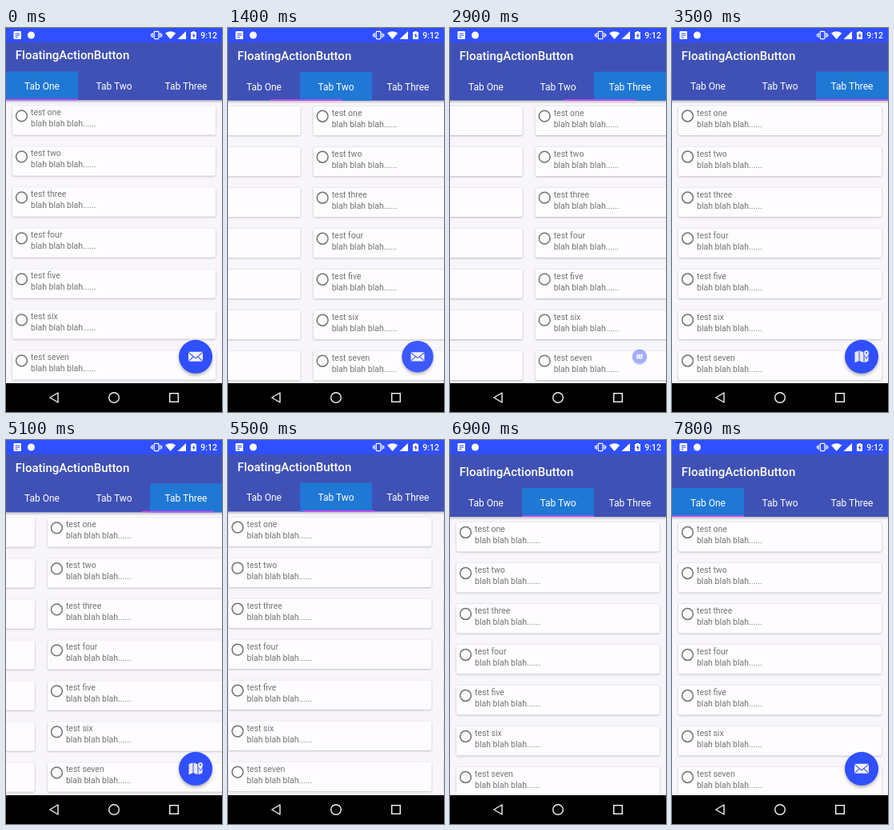
These frames come from a looping animation (270 px wide and 480 px high, 8 s). An HTML page:

```html
<!DOCTYPE html>
<html lang="en">
<head>
<meta charset="utf-8">
<title>Swipe tabs</title>
<style>
  html, body { margin: 0; width: 100%; height: 100%; overflow: hidden; background: #000; }
  svg { display: block; width: 100vw; height: 100vh; font-family: Roboto, sans-serif; }
  .title { font-size: 15px; font-weight: 500; fill: #fff; }
  .tab { font-size: 12px; fill: #fff; text-anchor: middle; }
  .row { font-size: 10.5px; fill: #747274; }
  .clock { font-size: 10.5px; font-weight: 500; fill: #fff; }
</style>
</head>
<body>
<svg viewBox="0 0 270 480">
  <defs>
    <linearGradient id="shade" x2="0" y2="1">
      <stop stop-color="#000" stop-opacity=".22"/>
      <stop offset="1" stop-color="#000" stop-opacity="0"/>
    </linearGradient>
    <filter id="soft" x="-30%" y="-30%" width="160%" height="160%">
      <feGaussianBlur stdDeviation="2"/>
    </filter>
    <filter id="cardSoft" x="-5%" y="-20%" width="110%" height="140%">
      <feGaussianBlur stdDeviation=".8"/>
    </filter>
    <g id="page"></g>
  </defs>

  <rect width="270" height="480" fill="#f8f6fa"/>

  <g id="content">
    <g id="pages">
      <use href="#page"/>
      <use href="#page" x="270"/>
      <use href="#page" x="540"/>
    </g>
    <rect y="96" width="270" height="4" fill="url(#shade)"/>
    <rect y="10" width="270" height="86" fill="#3f51b5"/>
    <text class="title" x="11.8" y="45.2">FloatingActionButton</text>
    <rect id="selected" y="60" width="90" height="36" fill="#1f78d4"/>
    <g id="labels"></g>
    <rect id="indicator" y="94.5" width="90" height="1.5" fill="#e040f5"/>
  </g>

  <g id="fab">
    <circle cy="2.5" r="20.5" fill="#000" opacity=".35" filter="url(#soft)"/>
    <circle r="21" fill="#304ffe"/>
    <g id="mail">
      <rect x="-9" y="-6" width="18" height="12" rx=".8" fill="#f2f2f4"/>
      <path d="M-9-5.4 0 2 9-5.4M-8.6 5.5-2.8 0M8.6 5.5 2.8 0" fill="none" stroke="#304ffe" stroke-width="1.1"/>
    </g>
    <g id="map">
      <path d="M-8.5-5.5-3.5-7.5V5.5L-8.5 7.5ZM-2.5-7.5 2.5-5.5V7.5L-2.5 5.5ZM3.5-4.5 8.5-6V5.5L3.5 7.5Z" fill="#e8e8ec"/>
      <path d="M6 2.5C4.8-.5 2.6-2 2.6-4.6a3.4 3.4 0 0 1 6.8 0C9.4-2 7.2-.5 6 2.5Z" fill="#f5f5f7" stroke="#304ffe" stroke-width=".8"/>
      <circle cx="6" cy="-4.6" r="1.1" fill="#304ffe"/>
    </g>
  </g>

  <g id="status">
    <rect width="270" height="18" fill="#304ffe"/>
    <rect x="9.5" y="4" width="9.5" height="10" rx="1" fill="#fff"/>
    <path d="M11.5 7h5.5M11.5 9.2h5.5M11.5 11.4h3" stroke="#304ffe"/>
    <circle cx="31.5" cy="9" r="4.5" fill="#fff"/>
    <g fill="none" stroke="#fff" stroke-width="1.2">
      <rect x="185.3" y="4.4" width="5.6" height="9.2" rx=".8"/>
      <path d="M183.3 6v6M192.9 6v6M181.5 7.3v3.4M194.7 7.3v3.4"/>
    </g>
    <path d="M199 6.6Q205.6 1.8 212.2 6.6L205.6 14ZM214.5 14 225 4v10Z" fill="#fff"/>
    <path d="M231 5h2V4h3v1h2v9h-7Z" fill="#fff"/>
    <path d="M235.3 6 232.8 9.8h1.5V13l2.3-4h-1.5Z" fill="#304ffe"/>
    <text class="clock" x="243.3" y="12.9">9:12</text>
  </g>

  <g id="nav">
    <rect y="444" width="270" height="36" fill="#000"/>
    <g fill="none" stroke="#f4f4f4" stroke-width="1.4">
      <path d="M65 456v12L54.8 462Z" stroke-linejoin="round"/>
      <circle cx="135" cy="462" r="6.3"/>
      <rect x="204.7" y="456.7" width="10.6" height="10.6"/>
    </g>
  </g>
</svg>

<script>
const LOOP = 8000, STEP = 100;
const el = id => document.getElementById(id);
const clamp = x => Math.min(1, Math.max(0, x));
const mix = (a, b, k) => a + (b - a) * k;

// Each gesture ends on a page and leaves the app bar at an offset.
const initial = { page: 0, bar: -5.7 };
const gestures = [
  { at: 1100, span: 900, page: 1, bar: -5 },
  { at: 2600, span: 900, page: 2, bar: -5.5 },
  { at: 5000, span: 800, page: 1, bar: -6.5 },
  { at: 6400, span: 400, page: 1, bar: 0 },
  { at: 7200, span: 700, page: 0, bar: 0 }
];

// A drag that picks up speed, then a long settle.
const swipe = u => 1 - (1 - clamp(u) ** 1.7) ** 6;

// The button pops out or in shortly after the finger lifts.
const RELEASE = 250, POP = 200;
const hasFab = page => page === 1 ? 0 : 1;

function stateAt(t) {
  let { page, bar } = initial, fab = hasFab(page);
  for (const g of gestures) {
    if (t < g.at) break;
    const k = swipe((t - g.at) / g.span);
    const pop = clamp((t - g.at - RELEASE) / POP);
    const shown = hasFab(g.page);
    page = mix(page, g.page, k);
    bar = mix(bar, g.bar, k);
    fab = mix(fab, shown, shown ? 1 - (1 - pop) ** 2 : pop ** 2);
  }
  return { page, bar, fab };
}

const names = ['one', 'two', 'three', 'four', 'five', 'six', 'seven', 'eight'];
el('page').innerHTML = names.map((name, i) => `
  <g transform="translate(0 ${103 + i * 51})">
    <rect x="8" y=".6" width="254" height="36.6" rx="2" fill="#000" opacity=".26" filter="url(#cardSoft)"/>
    <rect x="8" width="254" height="36.4" rx="2" fill="#fefcff"/>
    <circle cx="19.5" cy="12.5" r="6.9" fill="none" stroke="#737173" stroke-width="1.5"/>
    <text class="row" x="31" y="12.1">test ${name}</text>
    <text class="row" x="31" y="26.1">blah blah blah......</text>
  </g>`).join('');

el('labels').innerHTML = ['One', 'Two', 'Three'].map((name, i) =>
  `<text class="tab" x="${45 + i * 90}" y="82.9">Tab ${name}</text>`).join('');

function draw(t) {
  const { page, bar, fab } = stateAt(t);
  el('content').setAttribute('transform', `translate(0 ${bar})`);
  el('pages').setAttribute('transform', `translate(${-270 * page} 0)`);
  el('selected').setAttribute('x', Math.round(page) * 90);
  // The underline trails the page slightly.
  el('indicator').setAttribute('x', stateAt(t - 20).page * 90);
  el('fab').setAttribute('transform', `translate(237 410.8) scale(${fab})`);
  el('fab').setAttribute('opacity', fab);
  el('mail').setAttribute('display', page > 1 ? 'none' : 'inline');
  el('map').setAttribute('display', page > 1 ? 'inline' : 'none');
}

const start = performance.now();
function tick() {
  const t = (performance.now() - start) % LOOP;
  draw(Math.floor(t / STEP) * STEP);
  requestAnimationFrame(tick);
}
tick();
</script>
</body>
</html>
```
